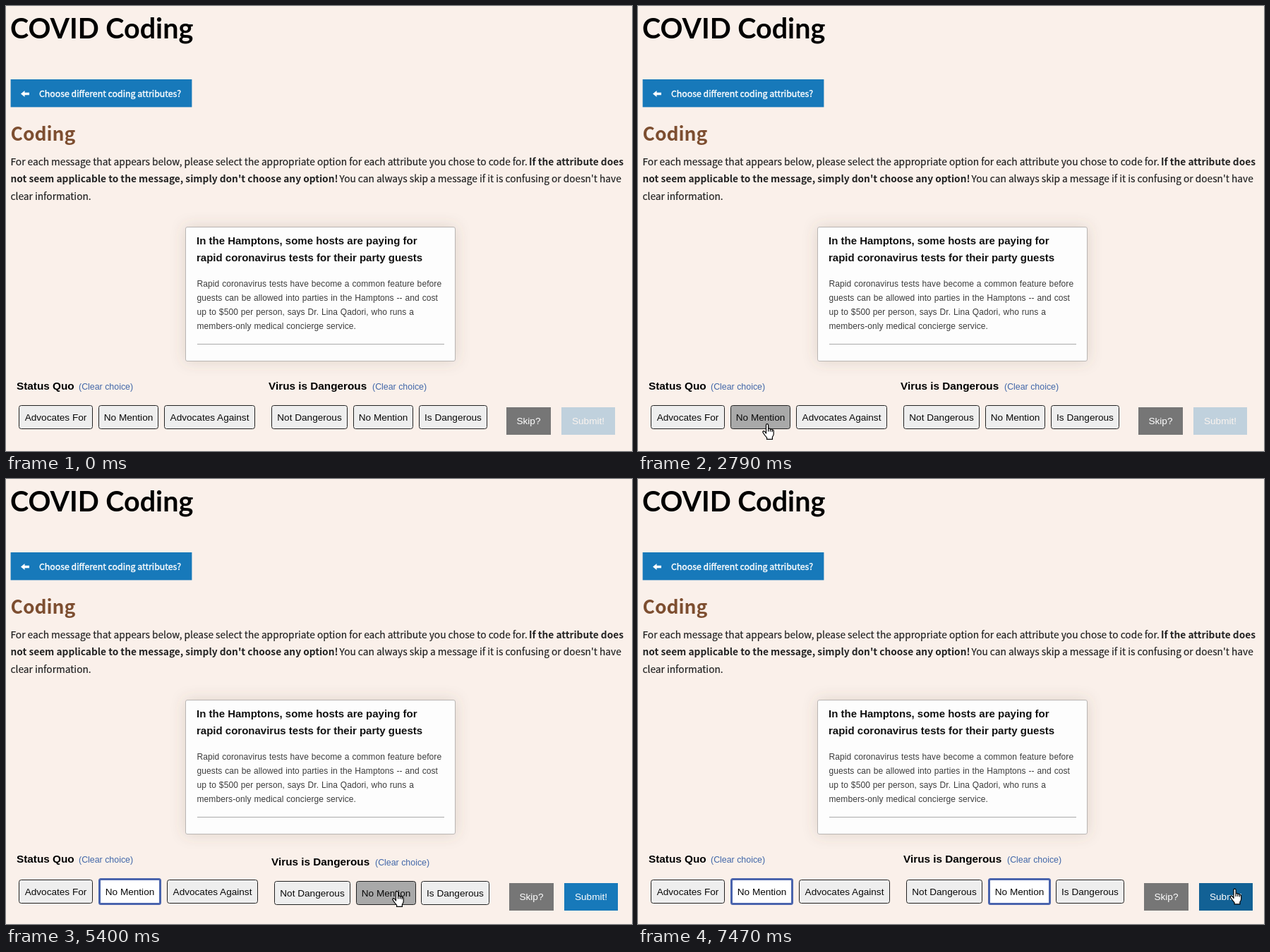
An HTML page that plays this animation: 887 by 631 pixels, repeating every 8 s.

```html
<!DOCTYPE html>
<html lang="en">
<head>
<meta charset="utf-8">
<title>Message coding</title>
<style>
  html, body { margin: 0; width: 100%; height: 100%; overflow: hidden; background: #faf0ea; }
  svg { display: block; }
  text { font-family: "Liberation Sans", Arial, sans-serif; fill: #0a0a0a; white-space: pre; }
  .prose text { font-family: "Noto Sans CJK JP", "Noto Sans CJK SC", "Noto Sans CJK", "Noto Sans", sans-serif; font-size: 13.72px; fill: #222; stroke: #222; stroke-width: .2px; }
  .prose .bold { font-weight: 700; stroke: none; }
  .title { font: 700 39.5px Lato, sans-serif; fill: #000; }
  .prose .section { font-size: 26.5px; font-weight: 700; fill: #7d4e30; stroke: none; }
  .prose .back { font-size: 12.32px; fill: #fff; stroke: #fff; stroke-width: .35px; }
  .headline text { font-size: 15px; font-weight: 700; fill: #111; }
  .story text { font-size: 12px; fill: #3c3c3c; letter-spacing: .09px; word-spacing: .4px; }
  .label { font-size: 15.3px; font-weight: 700; fill: #000; }
  .clear { font-size: 12.4px; fill: #4066a8; }
  .caption { font-size: 13.6px; text-anchor: middle; }
  .light { fill: #fefefe; }
</style>
</head>
<body>
<svg id="stage" width="887" height="631" viewBox="0 0 887 631" xmlns="http://www.w3.org/2000/svg">
  <defs>
    <filter id="glow" x="-20%" y="-30%" width="140%" height="160%">
      <feDropShadow dx="0" dy="0" stdDeviation="10" flood-color="#6b5448" flood-opacity=".2"/>
    </filter>
  </defs>
  <rect width="887" height="631" fill="#faf0ea"/>
  <text class="title" x="6" y="46">COVID Coding</text>
  <rect x="6.6" y="104" width="256.8" height="39.4" fill="#1779ba"/>
  <path d="M21 124.5l5.5-4.5v2.8h6.5v3.4h-6.5v2.8z" fill="#fff"/>
  <g class="prose">
    <text class="back" x="47" y="129">Choose different coding attributes?</text>
    <text class="section" x="6.5" y="191">Coding</text>
    <text x="6.5" y="226">For each message that appears below, please select the appropriate option for each attribute you chose to code for.</text>
    <text class="bold" x="741" y="226">If the attribute does</text>
    <text class="bold" x="6.5" y="250">not seem applicable to the message, simply don't choose any option!</text>
    <text x="472.5" y="250">You can always skip a message if it is confusing or doesn't have</text>
    <text x="6.5" y="275">clear information.</text>
  </g>
  <rect x="254.5" y="313.5" width="382" height="190" rx="2.5" fill="#fdfdfd" stroke="#b9b5b3" filter="url(#glow)"/>
  <g class="headline">
    <text x="270" y="338">In the Hamptons, some hosts are paying for</text>
    <text x="270" y="362">rapid coronavirus tests for their party guests</text>
  </g>
  <g class="story">
    <text x="270.5" y="398">Rapid coronavirus tests have become a common feature before</text>
    <text x="270.5" y="418">guests can be allowed into parties in the Hamptons -- and cost</text>
    <text x="270.5" y="438">up to $500 per person, says Dr. Lina Qadori, who runs a</text>
    <text x="270.5" y="458">members-only medical concierge service.</text>
  </g>
  <path d="M271 479.5H621" stroke="#a9a9a9"/>
  <text class="label" x="15" y="544">Status Quo</text>
  <text class="clear" x="103" y="544">(Clear choice)</text>
  <g id="heading">
    <text class="label" x="372" y="544">Virus is Dangerous</text>
    <text class="clear" x="519" y="544">(Clear choice)</text>
  </g>
  <g id="controls"></g>
  <g id="cursor" stroke="#000" fill="#fff" stroke-linejoin="round">
    <path id="arrow" stroke-width="1" d="M.5.5V16.3L4.2 12.8L6.7 18.4L9 17.4L6.6 11.9H11.3Z"/>
    <path id="hand" stroke-width="1.2" d="M5.5 14V2.2Q5.5.6 7 .6T8.6 2.2V7.4Q11.2 6.4 11.4 8.2Q13.7 7.4 14 9.2Q16.2 8.8 16.2 10.6V15Q16 17.5 14.4 19.2V22.4H6.6V20.2Q4 17.5 1 12.8Q.4 10.8 2.2 10.6Q3.6 10.8 5.5 14ZM8.6 7.4V11.5M11.4 8.2V11.6M14 9.2V12"/>
  </g>
</svg>
<script>
const LOOP = 8000, FADE = 250;
const FIRST_CLICK = 3825, SECOND_CLICK = 6400;
const IDLE = 238, HOVER = 169, CHOSEN = 255;

// Pointer samples: time, x, y, shape; each one holds until the next.
const pointer = [
  [0, 0, 0, ""],
  [1070, 155, 604, "arrow"], [1150, 167, 546, "arrow"], [1230, 174, 522, "arrow"],
  [1310, 177, 510, "arrow"], [1390, 178, 506, "arrow"],
  [2240, 178, 502, "arrow"], [2320, 178, 500, "arrow"], [2400, 178, 506, "arrow"],
  [2480, 180, 522, "arrow"], [2560, 181, 546, "arrow"], [2630, 177, 572, "hand"],
  [2710, 177, 587, "hand"], [2790, 176, 592, "hand"],
  [3560, 176, 590, "hand"], [3640, 176, 586, "hand"], [3710, 175, 583, "hand"],
  [3790, 175, 581, "hand"], [3860, 175, 581, "hand"], [3940, 177, 581, "hand"],
  [4020, 200, 585, "hand"], [4100, 270, 590, "hand"], [4170, 368, 592, "arrow"],
  [4250, 440, 591, "hand"], [4320, 467, 590, "hand"], [4400, 467, 590, "hand"],
  [4940, 474.5, 589.5, "hand"], [5020, 491, 589, "arrow"], [5090, 506, 588, "hand"],
  [5170, 526, 586, "hand"], [5250, 538, 585, "hand"], [5320, 544, 584, "hand"],
  [5400, 547, 584, "hand"],
  [6410, 548, 584, "hand"], [6490, 549, 583, "hand"], [6560, 550, 583, "hand"],
  [6640, 550, 583, "hand"], [6710, 550, 583, "hand"], [6790, 588, 582, "arrow"],
  [6870, 700, 580, "arrow"], [6950, 790, 578, "hand"], [7030, 822, 578, "hand"],
  [7100, 834, 580, "hand"], [7180, 838, 580, "hand"], [7260, 835, 575, "hand"],
  [7320, 832, 569.5, "hand"], [7470, 838.5, 580.5, "hand"]
];

const byId = id => document.getElementById(id);
const mix = (a, b, k) => a + (b - a) * k;
const ramp = (t, start) => Math.min(1, Math.max(0, (t - start) / FADE));
const grey = v => `rgb(${v},${v},${v})`;

function setAttrs(node, attrs) {
  for (const key in attrs) node.setAttribute(key, attrs[key]);
}

function addNode(parent, tag, attrs) {
  const node = document.createElementNS("http://www.w3.org/2000/svg", tag);
  setAttrs(node, attrs);
  return parent.appendChild(node);
}

function makeButton(caption, textClass = "") {
  const group = addNode(byId("controls"), "g", {});
  const box = addNode(group, "rect", {});
  const text = addNode(group, "text", { class: "caption " + textClass });
  text.textContent = caption;
  return { group, box, text };
}

function place({ box, text }, x, y, w, h, border, attrs) {
  setAttrs(box, {
    x: x + border / 2, y: y + border / 2, width: w - border, height: h - border,
    "stroke-width": border, ...attrs
  });
  setAttrs(text, { x: x + w / 2, y: Math.floor(y + h / 2 + 5) });
}

function placeOption(button, x, y, w, level, chosen = false) {
  if (chosen) place(button, x, y - 2, w + 4, 38, 3, { fill: grey(level), stroke: "#4a64ad", rx: 2 });
  else place(button, x, y, w, 34, 1, { fill: grey(level), stroke: "#222", rx: 3 });
}

const quo = ["Advocates For", "No Mention", "Advocates Against"].map(c => makeButton(c));
const danger = ["Not Dangerous", "No Mention", "Is Dangerous"].map(c => makeButton(c));
const skip = makeButton("Skip?", "light");
const submit = makeButton("Submit!", "light");

function level(t, enter, click) {
  return mix(mix(IDLE, HOVER, ramp(t, enter)), CHOSEN, ramp(t, click));
}

function draw(now) {
  const [t, px, py, shape] = pointer.findLast(p => p[0] <= now);
  const first = t >= FIRST_CLICK, second = t >= SECOND_CLICK;
  const dx = first ? 4 : 0, dx2 = second ? 4 : 0;

  const quoY = first ? 568 : 566;
  placeOption(quo[0], 18, quoY, 105, IDLE);
  placeOption(quo[1], 131, quoY, 85, level(t, 2540, FIRST_CLICK), first);
  placeOption(quo[2], 224 + dx, quoY, 129, IDLE);

  const lowered = first && !second;
  const dangerY = second ? 568 : lowered ? 570 : 566;
  setAttrs(byId("heading"), { transform: `translate(${dx} ${lowered ? 4 : 0})` });
  const leaving = mix(HOVER, IDLE, ramp(t, 4990));
  placeOption(danger[0], 376 + dx, dangerY, 108, t < 4990 ? level(t, 4150, LOOP) : leaving);
  placeOption(danger[1], 492 + dx, dangerY, 85, level(t, 5070, SECOND_CLICK), second);
  placeOption(danger[2], 585 + dx + dx2 - (first ? 1 : 0), dangerY, 97, IDLE);

  const actionY = first ? 573 : 569;
  const k = ramp(t, 6930);
  const blue = `rgb(${mix(23, 18, k)},${mix(121, 97, k)},${mix(186, 149, k)})`;
  place(skip, 709 + dx + dx2, actionY, 63, 39, 0, { fill: "#767676" });
  place(submit, 787 + dx + dx2, actionY, 76, 39, 0, { fill: blue });
  setAttrs(submit.group, { opacity: first ? 1 : .25 });

  setAttrs(byId("cursor"), { transform: `translate(${px} ${py})` });
  for (const id of ["arrow", "hand"]) {
    setAttrs(byId(id), { visibility: id === shape ? "visible" : "hidden" });
  }
}

const start = performance.now();
function tick() {
  draw((performance.now() - start) % LOOP);
  requestAnimationFrame(tick);
}
tick();
</script>
</body>
</html>
```
